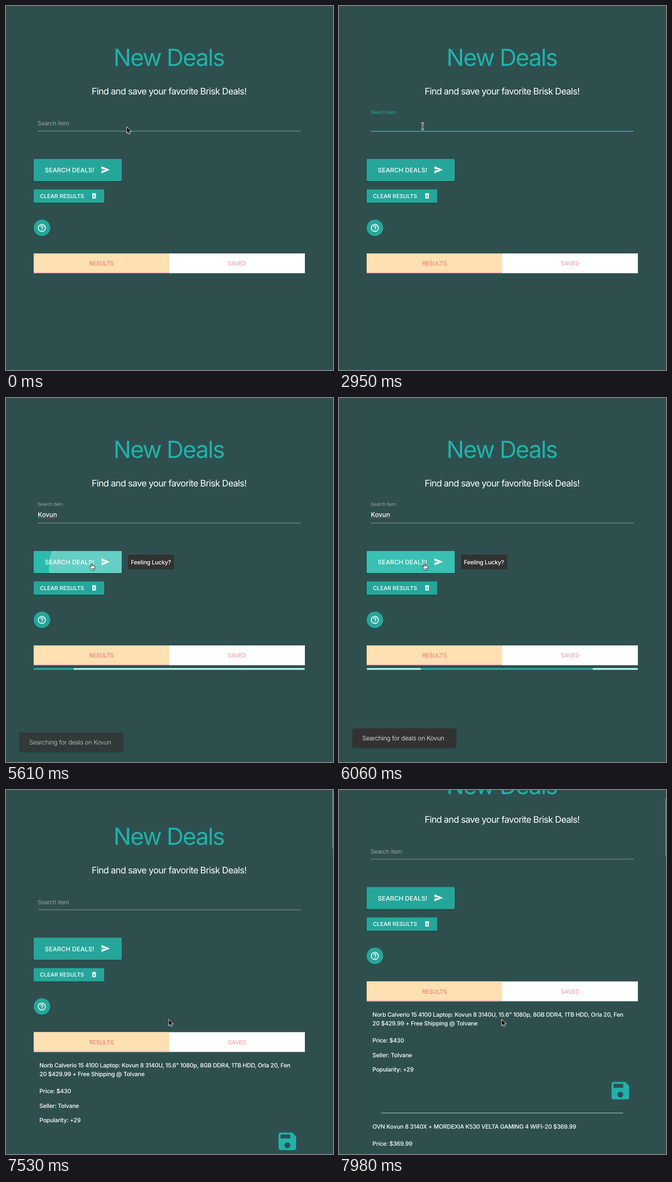
Write an HTML page that moves like this. It is 709 px wide and 790 px high and loops after 8000 ms.

```html
<!DOCTYPE html>
<html lang="en">
<head>
<meta charset="utf-8">
<title>New Deals</title>
<style>
  html, body { margin: 0; width: 709px; height: 790px; overflow: hidden; background: #2f4f4f; }
  svg { display: block; }
  text {
    font-family: Inter, "Noto Sans", sans-serif;
    font-optical-sizing: none;
    text-rendering: geometricPrecision;
    white-space: pre;
    fill: #fff;
  }
  .mid { text-anchor: middle; }
  .title { font-size: 51px; letter-spacing: -2.05px; fill: #20b2aa; }
  .sub { font-size: 19.6px; letter-spacing: -.75px; }
  .body { font-size: 12.7px; letter-spacing: -.25px; font-weight: 500; }
  .label { font-size: 12.7px; letter-spacing: -.3px; }
  .input { font-size: 14px; letter-spacing: -.15px; font-weight: 500; }
  .big { font-size: 13.4px; letter-spacing: .1px; font-weight: 500; }
  .small { font-size: 12px; letter-spacing: .05px; font-weight: 500; }
  .tab { font-size: 12.4px; letter-spacing: -.1px; fill: #ee6e73; }
  .toast { font-size: 13.5px; letter-spacing: -.25px; font-weight: 300; }
  .lift { filter: drop-shadow(0 1px 1px rgba(0, 0, 0, .32)); }
  .icon { fill: #fff; }
</style>
</head>
<body>
<svg width="709" height="790" viewBox="0 0 709 790">
  <defs>
    <clipPath id="btnClip"><rect x="60" y="332" width="191" height="48" rx="2"/></clipPath>
    <clipPath id="barClip"><rect x="60" y="586" width="588" height="4" rx="2"/></clipPath>
    <path id="beamShape" d="M-3-7q3 0 3 2q0-2 3-2M0-5V5M-3 7q3 0 3-2q0 2 3 2M-1.6 1.6h3.2"/>
  </defs>

  <g id="page">
    <text class="title mid" x="353" y="130">New Deals</text>
    <text class="sub mid" x="353.5" y="192">Find and save your favorite Brisk Deals!</text>

    <text id="label" class="label">Search item</text>
    <text id="typed" class="input" x="69" y="257.5"></text>
    <path id="spell" d="M69.5 259.5H109" stroke="#e0484d" stroke-width="1.3" stroke-dasharray="1.6 1.2"/>
    <rect id="caret" y="244" width="1" height="16" fill="#fff"/>
    <rect id="line" x="69" y="271" width="570"/>

    <rect id="btn" class="lift" x="60" y="332" width="191" height="48" rx="2"/>
    <g clip-path="url(#btnClip)"><circle id="ripple" cx="186" cy="366" fill="#fff"/></g>
    <text class="big" x="84.3" y="361">SEARCH DEALS!</text>
    <path class="icon" transform="translate(205.3 345.2) scale(.857)" d="M2 21L23 12 2 3v7l15 2-15 2z"/>

    <rect class="lift" x="60" y="398" width="153" height="29" rx="2" fill="#26a69a"/>
    <text class="small" x="73.5" y="416.6">CLEAR RESULTS</text>
    <path class="icon" transform="translate(183.3 404.3) scale(.64)" d="M6 19c0 1.1.9 2 2 2h8c1.1 0 2-.9 2-2V7H6v12zm2.46-7.12l1.41-1.41L12 12.59l2.12-2.12 1.41 1.41L13.41 14l2.12 2.12-1.41 1.41L12 15.41l-2.12 2.12-1.41-1.41L10.59 14l-2.13-2.12zM15.5 4l-1-1h-5l-1 1H5v2h14V4z"/>

    <circle class="lift" cx="78" cy="481.5" r="18" fill="#26a69a"/>
    <path class="icon" transform="translate(67.4 471.2) scale(.86)" d="M11 18h2v-2h-2v2zm1-16C6.48 2 2 6.48 2 12s4.48 10 10 10 10-4.48 10-10S17.52 2 12 2zm0 18c-4.41 0-8-3.59-8-8s3.59-8 8-8 8 3.59 8 8-3.59 8-8 8zm0-14c-2.21 0-4 1.79-4 4h2c0-1.1.9-2 2-2s2 .9 2 2c0 2-3 1.75-3 5h2c0-2.25 3-2.5 3-5 0-2.21-1.79-4-4-4z"/>

    <rect x="60" y="537" width="588" height="43" fill="#fff"/>
    <rect x="60" y="537" width="294" height="43" fill="#ffe0b2"/>
    <rect x="60" y="578" width="294" height="2" fill="#f6b2b5"/>
    <text class="tab mid" x="207" y="563.3">RESULTS</text>
    <text class="tab mid" x="501" y="563.3" opacity=".75">SAVED</text>

    <g id="progress" clip-path="url(#barClip)">
      <rect x="60" y="586" width="588" height="4" fill="#acece6"/>
      <rect id="bar" y="586" height="4" fill="#26a69a"/>
    </g>

    <g id="results">
      <text class="body" x="72.6" y="613">Norb Calverio 15 4100 Laptop: Kovun 8 3140U, 15.6” 1080p, 8GB DDR4, 1TB HDD, Orla 20, Fen</text>
      <text class="body" x="72.6" y="632">20 $429.99 + Free Shipping @ Tolvane</text>
      <text class="body" x="72.6" y="669.5">Price: $430</text>
      <text class="body" x="72.6" y="701">Seller: Tolvane</text>
      <text class="body" x="72.6" y="732">Popularity: +29</text>
      <path fill="#20b2aa" transform="translate(584.7 748.7) scale(2.11)" d="M17 3H5c-1.11 0-2 .9-2 2v14c0 1.1.89 2 2 2h14c1.1 0 2-.9 2-2V7l-4-4zm-5 16c-1.66 0-3-1.34-3-3s1.34-3 3-3 3 1.34 3 3-1.34 3-3 3zm3-10H5V5h10v4z"/>
      <rect x="92" y="822" width="524" height="1" fill="#d5dcdc"/>
      <text class="body" x="72.6" y="856">OVN Kovun 8 3140X + MORDEXIA K530 VELTA GAMING 4 WIFI-20 $369.99</text>
      <text class="body" x="72.6" y="893.5">Price: $369.99</text>
    </g>

    <g id="tip">
      <rect x="264.5" y="340" width="100" height="32" rx="2" fill="#323232"/>
      <text class="body mid" x="314.3" y="360.5">Feeling Lucky?</text>
    </g>
  </g>

  <g id="toast">
    <rect class="lift" x="29" y="717" width="225" height="42" rx="2" fill="#323232"/>
    <text class="toast" x="50.5" y="743.3">Searching for deals on Kovun</text>
  </g>

  <rect id="thumb" x="708" width="1" height="125" fill="#a9b4b4"/>

  <g id="arrow">
    <path d="M.7 1.3V13.1l2.7-2.5 2 4.7 2-.8-2-4.7h3.7z" stroke="#fff" stroke-width="1.7" paint-order="stroke" fill="#000"/>
  </g>
  <g id="beam" fill="none">
    <use href="#beamShape" stroke="#fff" stroke-width="2.8"/>
    <use href="#beamShape" stroke="#111"/>
  </g>
  <g id="hand" stroke="#000" stroke-width=".9">
    <path fill="#fff" d="M4.2 9V2.2c0-1.6 2.3-1.6 2.3 0v4.3c.3-1.2 2.2-1 2.3.2.5-.9 2-.7 2.1.4.5-.7 1.9-.5 1.9.8 0 2.8-.3 3.6-1 5.2l-.3 2.7H5.4L5 14.2C3.6 12.4 2.4 10.7 1.2 9.3c-.8-1.2.9-2 1.7-1.1z"/>
    <path d="M6.7 10.8v2.7M8.4 10.8v2.7M10.1 10.8v2.7"/>
  </g>
</svg>

<script>
const LOOP = 8000, WORD = "Kovun";

// Moments at which the screen refreshes.
const TICKS = [0, 150, 300, 450, 870, 1020, 1160, 1310, 1460, 1600, 1750, 2050, 2500, 2950,
  3240, 3540, 3840, 4140, 4440, 4590, 4730, 4880, 5030, 5170, 5460, 5610, 5750, 5900, 6040,
  6190, 6340, 6490, 6640, 6790, 6940, 7090, 7240, 7530, 7680, 7830, 7980];

// Step tables: [time, value...]
const CURSOR = [
  [0, "arrow", 261.5, 262], [150, "beam", 263, 265], [300, "beam", 262.5, 264.5], [450, "beam", 263, 264],
  [870, "beam", 250, 264], [1020, "beam", 225, 263], [1160, "beam", 200, 262],
  [1310, "beam", 185, 261], [1460, "beam", 181.3, 261],
  [4440, "beam", 181, 268], [4590, "arrow", 181, 292], [4730, "hand", 180, 334],
  [4880, "hand", 180, 343], [5030, "hand", 180, 352], [5170, "hand", 180, 358],
  [6490, "hand", 187, 357], [6640, "arrow", 250.5, 354.5], [6790, "arrow", 300, 402],
  [6940, "arrow", 331, 456], [7090, "arrow", 348, 488], [7240, "arrow", 352.5, 497.5]
];
const CARET = [[0, 0], [1600, 1], [2050, 0], [2500, 1], [2950, 0], [3240, 1], [4730, 0], [5170, 1], [5460, 0]];
const TYPED = [[0, 0], [3240, 1], [3540, 2], [3840, 4], [4140, 5], [6340, 0]];
const SCROLL = [[0, 0], [7530, 11.5], [7680, 38], [7830, 78], [7980, 121.5]];

const $ = id => document.getElementById(id);
const set = (id, attrs) => { for (const k in attrs) $(id).setAttribute(k, attrs[k]); };
const show = (id, on) => { $(id).style.display = on ? "" : "none"; };
const step = (table, t) => table.filter(row => row[0] <= t).pop();
const ramp = (t, start, span) => Math.min(1, Math.max(0, (t - start) / span));
const out = p => 1 - (1 - p) ** 3;
const mix = (a, b, p) => a + (b - a) * p;

function drawField(t) {
  const focus = t >= 1600 && t < 5460;
  const up = ramp(t, 1530, 200) - ramp(t, 6300, 200);
  set("label", {
    transform: `translate(68.6 ${mix(259.2, 233.5, up)}) scale(${mix(1, .8, up)})`,
    style: `fill:${focus ? "#26a69a" : "#9e9e9e"}`
  });
  set("line", { height: focus ? 2 : 1, fill: focus ? "#26a69a" : "#9e9e9e" });

  const typed = $("typed"), count = step(TYPED, t)[1];
  typed.textContent = WORD.slice(0, count);
  set("caret", { x: 69 + (count ? Math.round(typed.getComputedTextLength()) - 1 : 0) });
  show("caret", step(CARET, t)[1]);
  show("spell", t >= 5030 && t < 6340);
}

function drawButton(t) {
  const hover = ramp(t, 4850, 150) - ramp(t, 6600, 190);
  const rgb = [[38, 43], [166, 187], [154, 173]].map(([a, b]) => Math.round(mix(a, b, hover)));
  set("btn", { fill: `rgb(${rgb})` });
  set("ripple", { r: Math.max(0, .49 * (t - 5420)), opacity: .28 * (1 - ramp(t, 5700, 450)) });

  const enter = out(ramp(t, 4855, 300)), leave = ramp(t, 6630, 250);
  const shown = enter * (1 - leave);
  set("tip", { transform: `translate(${-10 * (1 - shown)} 0)`, opacity: shown });
}

function drawResults(t) {
  const p = ramp(t, 5527, 1260);
  const left = Math.max(0, mix(-.35, 1, p)), right = Math.min(1, 1.9 * p * mix(1.2, .9, p));
  set("bar", { x: 60 + 588 * left, width: 588 * Math.max(0, right - left) });
  show("progress", t >= 5460 && t < 6340);
  show("results", t >= 6340);

  const rise = out(ramp(t, 5500, 300)), gone = ramp(t, 6100, 375);
  set("toast", { transform: `translate(0 ${35 * (1 - rise) - 40 * gone})`, opacity: rise * (1 - gone) });
}

function draw(time) {
  const t = TICKS.filter(tick => tick <= time).pop();
  drawField(t);
  drawButton(t);
  drawResults(t);

  const y = step(SCROLL, t)[1];
  set("page", { transform: `translate(0 ${-y})` });
  set("thumb", { y: y * .155 });
  show("thumb", y > 0);

  const [, kind, cx, cy] = step(CURSOR, t);
  for (const id of ["arrow", "beam", "hand"]) show(id, id === kind);
  set(kind, { transform: `translate(${cx} ${cy})` });
}

const start = performance.now();
function loop() {
  draw((performance.now() - start) % LOOP);
  requestAnimationFrame(loop);
}
loop();
</script>
</body>
</html>
```
